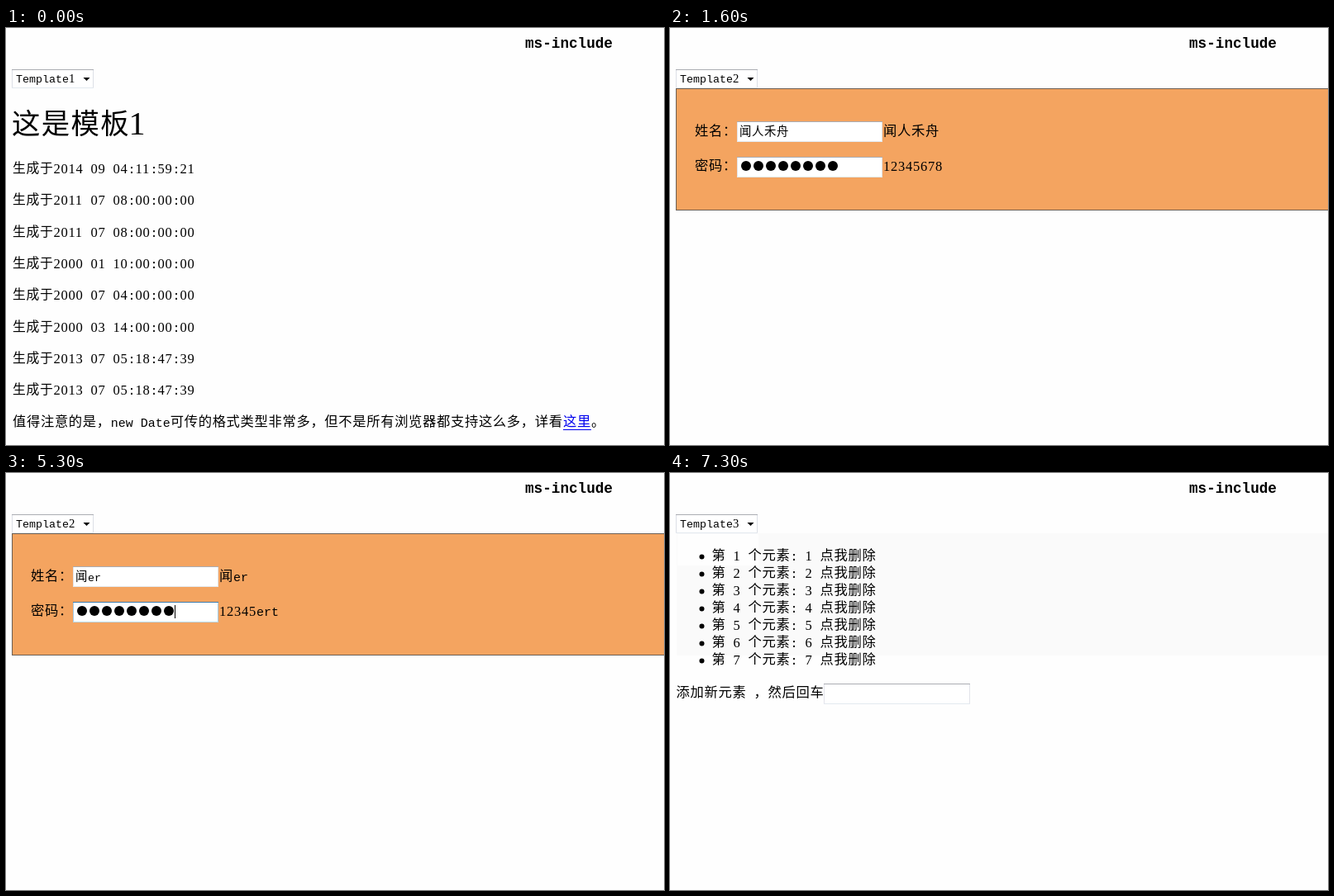
Animation, 796 px wide and 505 px high, one loop 8 s. Source, as an HTML page:

```html
<!DOCTYPE html>
<html lang="zh-CN">
<head>
<meta charset="utf-8">
<title>ms-include</title>
<style>
  html, body { margin: 0; width: 100%; height: 100%; overflow: hidden; background: #fefefe; }
  svg { display: block; width: 796px; height: 505px; }
  text { white-space: pre; }
  .latin { font-family: "Liberation Mono", monospace; }
  .digit { font-family: "Liberation Serif", serif; }
  .cjk { font-family: "Noto Sans CJK SC", "Noto Sans CJK", "Noto Sans CJK JP", sans-serif; }
</style>
</head>
<body>
<svg viewBox="0 0 796 505">
  <defs>
    <linearGradient id="hot" x2="0" y2="1">
      <stop offset="0" stop-color="#eaf6fd"/><stop offset=".48" stop-color="#d9f0fc"/>
      <stop offset=".52" stop-color="#bee6fd"/><stop offset="1" stop-color="#a7d9f5"/>
    </linearGradient>
    <linearGradient id="pressed" x2="0" y2="1">
      <stop offset="0" stop-color="#d5eefb"/><stop offset=".5" stop-color="#a5d8f3"/>
      <stop offset="1" stop-color="#7cbee2"/>
    </linearGradient>
  </defs>
  <g id="scene"></g>
</svg>
<script>
const LOOP = 8000;
const NAME = "闻人禾舟";

// Each track is a list of [time, value]; a value holds until the next time.
const tracks = {
  page: [[0, 1], [1600, 2], [7300, 3]],
  hover: [[0, 0], [500, .5], [600, 1], [1600, 0], [6200, 1], [7300, 0]],
  press: [[0, 0], [800, 1], [1100, 0], [6500, 1], [6800, 0]],
  pick: [[0, 0], [1000, 1], [1300, 2], [1600, 0], [6500, 2], [6700, 3], [7300, 0]],
  name: [[0, NAME], [2900, NAME.slice(0, 3)], [3100, NAME.slice(0, 2)], [3200, NAME[0]],
         [3300, NAME[0] + "e"], [3400, NAME[0] + "er"]],
  nameFocus: [[0, 0], [2000, .4], [2100, .7], [2200, 1], [3900, 0]],
  nameCaret: [[0, 0], [2000, 1], [2600, 0], [2900, 1], [3900, 0]],
  pass: [[0, "12345678"], [4700, "1234567"], [4900, "123456"], [5000, "12345"],
         [5200, "12345er"], [5300, "12345ert"], [5400, "12345ertgr"], [5500, "12345ertgre"]],
  passFocus: [[0, 0], [4200, .4], [4300, .7], [4400, 1], [5900, .5], [6000, 0]],
  passCaret: [[0, 0], [4200, 1], [5900, 0]]
};

const dates = ["2014 09 04:11:59:21", "2011 07 08:00:00:00", "2011 07 08:00:00:00",
  "2000 01 10:00:00:00", "2000 07 04:00:00:00", "2000 03 14:00:00:00",
  "2013 07 05:18:47:39", "2013 07 05:18:47:39"];

const valueAt = (track, t) => track.reduce((v, [time, next]) => time <= t ? next : v, track[0][1]);
const range = n => [...Array(n).keys()];
const isWide = s => s >= "\u2e80";
const textWidth = (s, wide, narrow) => [...s].reduce((w, c) => w + (isWide(c) ? wide : narrow), 0);

const rect = (x, y, w, h, fill, extra = "") =>
  `<rect x="${x}" y="${y}" width="${w}" height="${h}" fill="${fill}" ${extra}/>`;

// Font size, letter gap and baseline lift for the three kinds of run.
function runStyle(run, wide, narrow) {
  if (isWide(run)) return { kind: "cjk", size: wide * .96, gap: wide * .04, lift: wide * .045 };
  if (/\d/.test(run)) return { kind: "digit", size: narrow * 1.84, gap: narrow * .08, lift: 0 };
  return { kind: "latin", size: narrow / .6, gap: 0, lift: 0 };
}

// Mixed text: ideographs, digits and Latin runs each get their own font.
function text(x, y, str, { wide = 17, narrow = 9, fill = "#000", weight = 400 } = {}) {
  let out = "";
  for (const run of str.match(/[\u2e80-\uffef]+|\d+|[^\d\u2e80-\uffef]+/g) || []) {
    const { kind, size, gap, lift } = runStyle(run, wide, narrow);
    out += `<text class="${kind}" x="${x}" y="${y - lift}" font-size="${size}" ` +
      `letter-spacing="${gap}" font-weight="${weight}" fill="${fill}">${run}</text>`;
    x += textWidth(run, wide, narrow);
  }
  return out;
}

function frame(x, y, w, h, top, side, bottom) {
  return rect(x, y, w, 1, top) + rect(x, y + 1, 1, h - 1, side) +
    rect(x + w - 1, y + 1, 1, h - 1, side) + rect(x, y + h - 1, w, 1, bottom);
}

function field(x, y, w, focus = 0) {
  return rect(x, y, w, 25, "#fff") + frame(x, y, w, 25, "#abadb3", "#e2e3ea", "#e3e9ef") +
    `<g opacity="${focus}">${frame(x, y, w, 25, "#3d7bad", "#a4c9e3", "#b7d9ed")}</g>`;
}

function select(s) {
  const fill = s.press ? "pressed" : "hot";
  return rect(7, 50, 99, 23, "#fff") + frame(7, 50, 99, 23, "#abadb3", "#dcdfe6", "#e3e9ef") +
    `<g opacity="${s.hover}">${frame(7, 50, 99, 23, "#5794bf", "#8bb9d8", "#a9cfe5")}` +
    `<rect x="89.5" y="50.5" width="16" height="22" rx="1" fill="url(#${fill})" stroke="#3c7fb1"/></g>` +
    `<path d="M93.5 60h8l-4 4z"/>` +
    text(12, 66, "Template" + s.page, { narrow: 8 });
}

function menu(pick) {
  return rect(8, 73, 99, 59, "#fff") + rect(8, 73, 1, 59, "#555") +
    rect(8, 73, 98, 1, "#8a9aa6") + rect(8, 131, 98, 1, "#111") +
    [1, 2, 3].map(n => {
      const y = 55 + 19 * n;
      const on = n === pick;
      return (on ? rect(9, y, 98, 19, "#39f") : "") +
        text(12, y + 14, "Template" + n, { narrow: 8, fill: on ? "#fff" : "#000" });
    }).join("");
}

function datePage() {
  const note = "值得注意的是，new Date可传的格式类型非常多，但不是所有浏览器都支持这么多，详看";
  return text(7, 129.5, "这是模板", { wide: 35.8, weight: 500 }) +
    `<text class="digit" x="148.5" y="129" font-size="40">1</text>` +
    dates.map((d, i) => text(8, Math.round(176 + 38.35 * i), "生成于" + d, { wide: 16.5 })).join("") +
    text(8, 483, note, { wide: 16.97 }) +
    text(674, 483, "这里", { fill: "#00e" }) + rect(674, 486, 34, 1, "#00e") +
    text(708, 483, "。");
}

function formPage(s) {
  const caret = (x, y) => rect(x, y, 1, 16, "#000");
  return rect(7.5, 73.5, 800, 147, "#f4a460", `stroke="#6b5f55"`) +
    text(30, 131, "姓名：") + field(81, 113, 176, s.nameFocus) +
    text(84, 131, s.name, { wide: 15, narrow: 8 }) + text(258, 131, s.name) +
    (s.nameCaret ? caret(84 + textWidth(s.name, 15, 8), 118) : "") +
    text(30, 173, "密码：") + field(81, 156, 176, s.passFocus) +
    range(s.pass.length).map(i => `<circle cx="${92 + 15 * i}" cy="167" r="6"/>`).join("") +
    text(258, 173, s.pass) +
    (s.passCaret ? caret(84 + 15 * s.pass.length, 160) : "");
}

function listPage() {
  return rect(8, 73, 788, 148, "#fafafa") + rect(9, 74, 98, 38, "#fefefe") +
    range(7).map(i => {
      const n = i + 1;
      return `<circle cx="38.5" cy="${101.5 + 21 * i}" r="3"/>` +
        text(50.5, 106 + 21 * i, `第 ${n} 个元素: ${n} 点我删除`);
    }).join("") +
    text(7.5, 272, "添加新元素 ，然后回车") + field(186, 255, 177);
}

const pages = [datePage, formPage, listPage];

function scene(t) {
  const s = {};
  for (const key in tracks) s[key] = valueAt(tracks[key], t);
  return text(628, 24, "ms-include", { narrow: 10.6, weight: 700 }) +
    pages[s.page - 1](s) + select(s) + (s.pick ? menu(s.pick) : "");
}

const root = document.getElementById("scene");
let start, shown;

function draw(t) {
  const markup = scene(t);
  if (markup !== shown) root.innerHTML = shown = markup;
}

function tick(now) {
  start ??= now;
  draw((now - start) % LOOP);
  requestAnimationFrame(tick);
}

draw(0);
requestAnimationFrame(tick);
</script>
</body>
</html>
```
